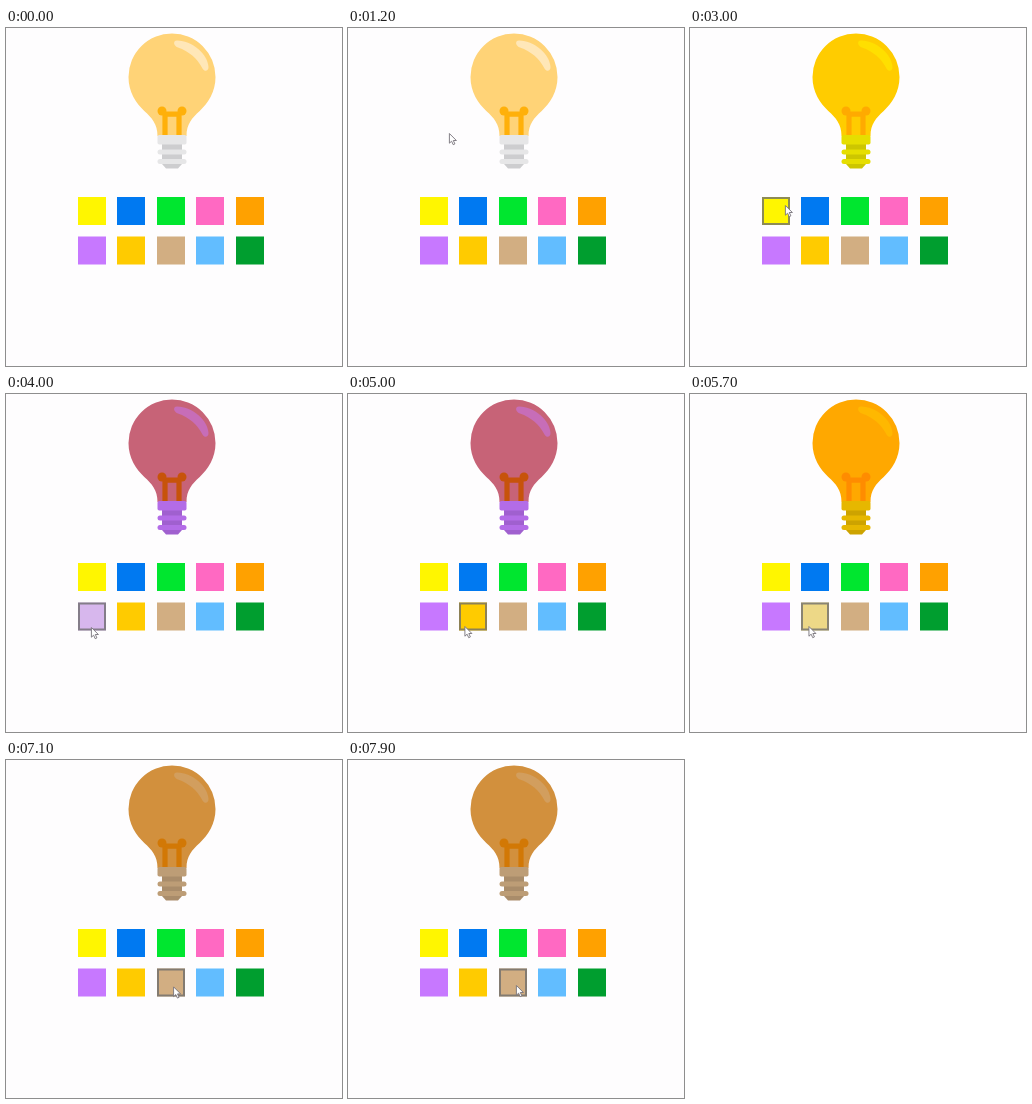
These frames come from a looping animation (336 px wide and 338 px high, 8 s). An HTML page:

```html
<!DOCTYPE html>
<html lang="en">
<head>
<meta charset="utf-8">
<title>Bulb colours</title>
<style>
  html, body { margin: 0; width: 100%; height: 100%; overflow: hidden; background: #fefdfe; }
  svg { display: block; width: 100vw; height: 100vh; }
</style>
</head>
<body>
<svg viewBox="0 0 336 338" preserveAspectRatio="none">
  <g id="bulb"></g>
  <g id="swatches"></g>
  <path id="pointer" d="M.4 .5V10.200L2.600 8.200L4.200 11.700L5.900 10.900L4.300 7.500H7.400Z" fill="#fff" stroke="#77727a" stroke-width=".9" stroke-linejoin="round"/>
</svg>
<script>
const LOOP = 8000;
const STEP = 100;
const CENTER = 166;
const SIZE = 28;
const PITCH = 39.5;

const byId = id => document.getElementById(id);
const parse = hex => [1, 3, 5].map(i => parseInt(hex.slice(i, i + 2), 16));
const rgb = c => `rgb(${c.map(Math.round)})`;
const multiply = (a, b) => a.map((v, i) => v * b[i] / 255);
const mix = (a, b, k) => a.map((v, i) => v + (b[i] - v) * k);
const ease = k => k * k * (3 - 2 * k);
const white = parse("#ffffff");
const flashTone = parse("#e1e1e1");

function make(parent, name, attrs) {
  const el = document.createElementNS("http://www.w3.org/2000/svg", name);
  for (const key in attrs) el.setAttribute(key, attrs[key]);
  return parent.appendChild(el);
}

// Bulb: every part keeps its own colour, which the chosen tint multiplies.
const parts = [];
function part(hex, name, attrs) {
  const el = make(byId("bulb"), name, attrs);
  parts.push({ el, base: parse(hex), paint: attrs.fill ? "stroke" : "fill" });
}
function band(hex, y, width, height, rx) {
  part(hex, "rect", { x: CENTER - width / 2, y, width, height, rx });
}

const GLASS = "#ffd377", SHINE = "#ffe7b8", WIRE = "#ffb00a", SCREW = "#cdcdcf", METAL = "#e6e6e7";

part(GLASS, "path", { d: "M166 5.5A43.5 43.5 0 0 1 209.5 49C209.5 64 202 75 193.700 83C186 90 180.500 96 180.500 108H151.500C151.500 96 146 90 138.300 83C130 75 122.500 64 122.500 49A43.500 43.500 0 0 1 166 5.500Z" });
part(SHINE, "path", { d: "M171 12.500C187 12.500 202 27 202.500 39C202.500 43.500 198.500 44 196.500 40.500C191 30 183 23.500 172 19.500C167 17.500 167 12.500 171 12.500Z" });
part(WIRE, "path", { d: "M159 107V86.200H173V107", fill: "none", "stroke-width": 5.2 });
for (const side of [-1, 1]) part(WIRE, "circle", { cx: CENTER + side * 10, cy: 83, r: 4.5 });
part(SCREW, "path", { d: "M156 114H176V136L172 140.500H160L156 136Z" });
band(METAL, 107, 29, 9.5, 1.8);
for (const y of [121.5, 131]) band(METAL, y, 29, 5, 2.5);

// Swatches: two rows of five.
const palette = "#fff600 #0079f1 #00e62f #ff69c2 #ffa100 #c778ff #ffcb00 #d2ae82 #62bdff #009e2f";
const swatches = palette.split(" ").map((hex, i) => {
  const x = Math.floor(72 + PITCH * (i % 5));
  const y = 169 + PITCH * Math.floor(i / 5);
  const fill = make(byId("swatches"), "rect", { x, y, width: SIZE, height: SIZE });
  const border = make(byId("swatches"), "rect", {
    x: x + 1, y: y + 1, width: SIZE - 2, height: SIZE - 2,
    fill: "none", stroke: "#6e6e6e", "stroke-width": 2, "stroke-opacity": .78
  });
  return { color: parse(hex), x, y, fill, border };
});

// Pointer: rests between "from" and "to", glides from one rest to the next.
const SHOW = 500;
const FLASH = 200;
const rest = (index, dx, dy, from, to, click) =>
  ({ index, x: swatches[index].x + dx, y: swatches[index].y + dy, from, to, click });
const rests = [
  { x: 101, y: 105, from: SHOW, to: 1300 },
  rest(0, 23, 8, 2000, 3000, 2300),
  rest(5, 13, 24.5, 3700, 4400, 3900),
  rest(6, 5.5, 23.5, 5000, 5600, 5600),
  rest(7, 13, 23.5, 6400, 6600, 6900),
  rest(7, 17, 16.5, 7300, LOOP)
];

function pointerAt(t) {
  const i = rests.findLastIndex(r => r.from <= t);
  if (i < 0) return null;
  const a = rests[i], b = rests[i + 1];
  if (t <= a.to || !b) return a;
  const k = ease((t - a.to) / (b.from - a.to));
  return { x: a.x + (b.x - a.x) * k, y: a.y + (b.y - a.y) * k };
}

const inside = (p, s) => p.x >= s.x && p.x < s.x + SIZE && p.y >= s.y && p.y < s.y + SIZE;
const show = (el, on) => { el.style.display = on ? "" : "none"; };

function draw(time) {
  const t = Math.floor(time % LOOP / STEP) * STEP;
  const p = pointerAt(t);
  show(byId("pointer"), p);
  if (p) byId("pointer").setAttribute("transform", `translate(${p.x} ${p.y})`);

  const last = rests.findLast(r => r.click <= t);
  const tint = last ? swatches[last.index].color : white;
  for (const { el, base, paint } of parts) el.setAttribute(paint, rgb(multiply(base, tint)));

  swatches.forEach((s, i) => {
    const pressed = last && last.index === i && t < last.click + FLASH;
    s.fill.setAttribute("fill", rgb(mix(s.color, flashTone, pressed ? .6 : 0)));
    show(s.border, p && inside(p, s));
  });
}

const start = performance.now();
function tick() {
  draw(performance.now() - start);
  requestAnimationFrame(tick);
}
tick();
</script>
</body>
</html>
```
